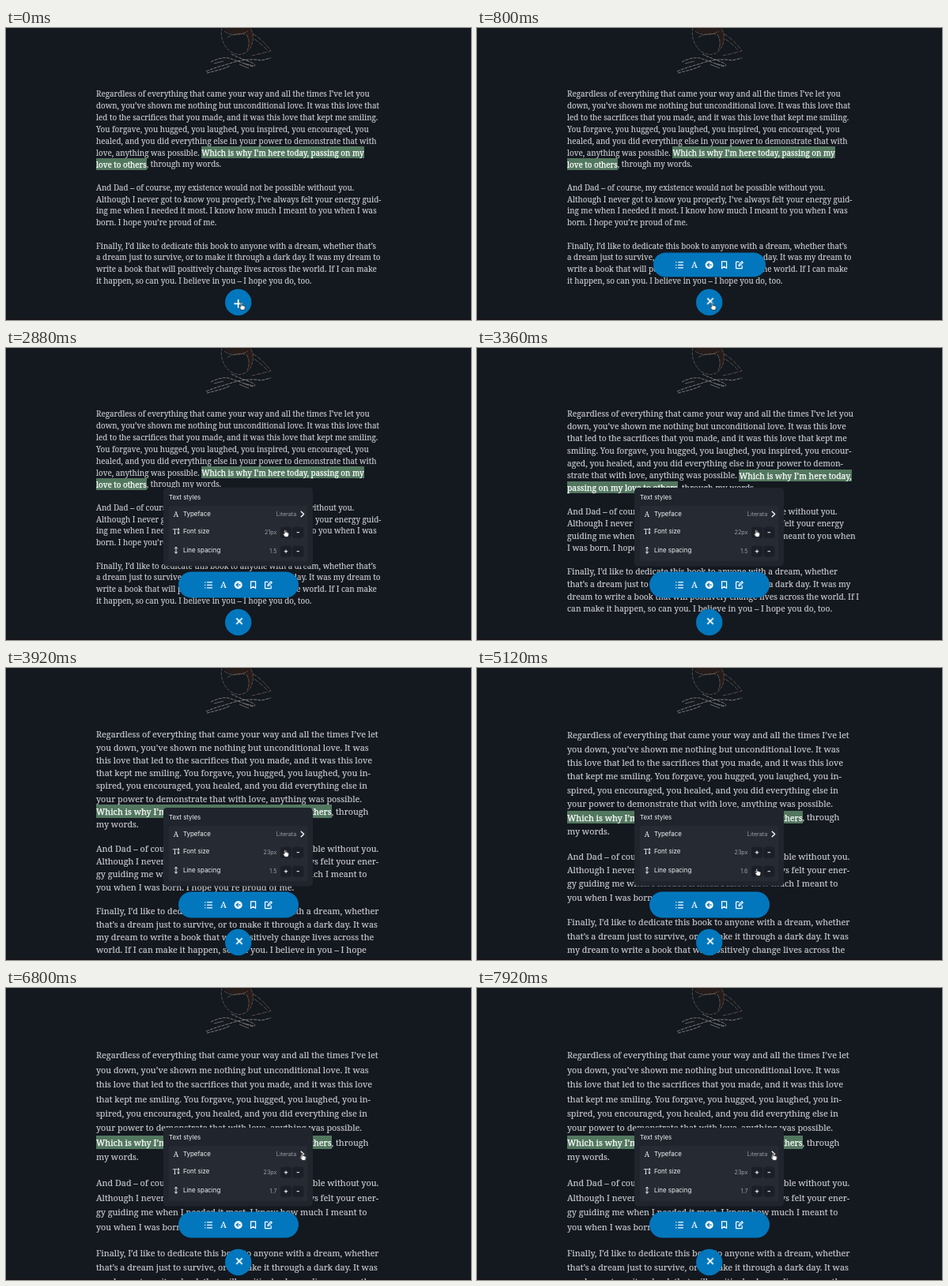
Write an HTML page that moves like this. It is 588x370 px and loops after 8 s.

```html
<!DOCTYPE html>
<html lang="en">
<head>
<meta charset="utf-8">
<title>Reader settings</title>
<style>
  html, body { margin: 0; width: 100%; height: 100%; overflow: hidden; background: #14181f; }
  #stage { position: relative; width: 588px; height: 370px; overflow: hidden; }
  .page { position: absolute; left: 114px; top: 76.3px; color: #c9cbce; white-space: nowrap;
    font-family: "Noto Serif", serif; -webkit-text-stroke: .15px; visibility: hidden; }
  .page p { margin: 0 0 14.5px; }
  mark { background: #52775f; color: #fff; padding: .06em 0; -webkit-text-stroke: .25px; }
  svg { position: absolute; inset: 0; }
  svg text { font-family: Inter, sans-serif; font-size: 7.9px; fill: #f1f2f4; }
  svg .serif { font-family: "Noto Serif", serif; text-anchor: middle; }
  svg .value { font-size: 7.2px; fill: #9a9da3; text-anchor: end; }
  .line { fill: none; stroke: #fff; stroke-width: 1.2; stroke-linecap: round; stroke-linejoin: round; }
  .sketch { fill: none; stroke: #75665b; stroke-width: .7; }
</style>
</head>
<body>
<div id="stage">
  <svg width="588" height="370" viewBox="0 0 588 370">
    <path d="M275 0C281 8 293 10 302 6C306 10 308 18 306 27C311 23 314 14 312 6L309 0Z" fill="#261c1a"/>
    <g class="sketch">
      <path d="M273 0C271 8 273 17 278 24C283 31 291 35 299 33C308 30 314 20 312 7L309 0" stroke-dasharray="4 1.5"/>
      <path d="M276 4C284 10 296 10 306 4M280 12C286 8 294 6 302 8M304 8C308 15 308 22 305 28" stroke-dasharray="5 1"/>
      <path d="M312 7C320 12 329 20 335 29C328 31 320 33 311 35M314 14C320 18 327 24 331 29" stroke-dasharray="6 1.5"/>
      <path d="M253 55C264 50 277 47 289 43C299 40 311 39 323 41L335 38M254 57C265 54 273 53 283 48" stroke="#aaa6a1" stroke-dasharray="4 1.2"/>
      <path d="M259 43C267 39 274 37 281 38C289 40 298 44 309 48C314 50 318 47 311 44C302 40 292 37 285 33" stroke="#a19a93" stroke-dasharray="4 1.2"/>
      <path d="M263 45L275 42M295 46L307 51M301 45L313 48" stroke="#8c857e"/>
    </g>
    <path d="M0 369.5H588" stroke="#1d1114"/>
  </svg>

  <div id="pages"></div>

  <svg width="588" height="370" viewBox="0 0 588 370">
    <g id="panel">
      <rect x="199" y="177" width="189" height="99.5" rx="4.5" fill="#20252d"/>
      <text x="206" y="192.3">Text styles</text>
      <rect x="206" y="200" width="175" height="70" rx="2" fill="#262b33"/>
      <text class="serif" x="215" y="214" style="font-size:9px">A</text>
      <text class="serif" x="213.6" y="235.6" style="font-size:9px">T</text>
      <path class="line" d="M218 229V235M216.9 230L218 228.8L219.1 230M216.9 234L218 235.2L219.1 234M215 252.5V260M213.4 254L215 252.2L216.6 254M213.4 258.5L215 260.3L216.6 258.5" style="stroke-width:.9"/>
      <text x="224" y="213.2">Typeface</text>
      <text x="224" y="234.7">Font size</text>
      <text x="224" y="259">Line spacing</text>
      <text class="value" x="367.3" y="213.2">Literata</text>
      <path class="line" d="M373.2 207.2L376.6 210.5L373.2 213.8" style="stroke-width:1.4"/>
      <g id="steppers"></g>
    </g>

    <g id="menu">
      <rect id="pill" x="218" y="283.5" width="152" height="33" rx="16.5" fill="#0277bd"/>
      <g id="icons">
        <path class="line" d="M254.5 296.8H260.5M254.5 300.3H260.5M254.5 303.8H260.5M251.6 296.8H252M251.6 300.3H252M251.6 303.8H252"/>
        <text class="serif" x="275" y="304.2" style="font-size:11.2px;font-weight:500;fill:#fff">A</text>
        <circle cx="293.7" cy="300.2" r="5" fill="#fff"/>
        <path class="line" d="M296.2 300.2H291.2M293.6 297.8L291.2 300.2L293.6 302.6" style="stroke:#0277bd"/>
        <path class="line" d="M309.6 295.8H315.6V304.6L312.6 302.2L309.6 304.6Z"/>
        <path class="line" d="M331 296.4H327.6V304.6H335.2V301.4M331 301.6L331.4 299.6L335 295.9L336.3 297.2L332.7 300.9Z"/>
      </g>
    </g>

    <g id="tip">
      <rect x="213" y="275.5" width="88" height="17.5" rx="2.5" fill="#fff"/>
      <text x="219" y="287.3" style="font-size:9.6px;fill:#111">Customize styles</text>
    </g>

    <circle cx="293.7" cy="347.5" r="16.7" fill="#0277bd"/>
    <path id="plus" class="line" d="M288.4 349.4H299M293.7 344.1V354.7" style="stroke-width:1.7;stroke-linecap:butt;transform-origin:293.7px 347.5px"/>

    <g id="cursor">
      <path d="M-1.9-3.8C-1.9-5-.3-5-.3-3.8V-1.3C.5-1.9 1.1-1.5 1.3-1.1C2-1.5 2.6-1.1 2.7-.6C3.4-.9 3.9-.3 3.9.3C3.9 2.2 3.2 2.8 3 4.4H-1.1C-1.6 3.2-3 2-3.5.8C-3.7.1-2.7-.3-1.9.8Z"
        fill="#fff" stroke="#111" stroke-width=".7" stroke-linejoin="round"/>
    </g>
  </svg>
</div>

<script>
const LOOP = 8000, SCALE = 9.86 / 21;
const $ = id => document.getElementById(id);

// A digit marks where that layout breaks the line; "~" before it adds a hyphen.
const paragraphs = [
  "Regardless of everything that came your way and all the times I’ve let 3you 12down, you’ve shown me nothing but unconditional love. It was 3this love 2that 1led to the sacrifices that you made, and it was this love 3that kept me 2smiling. 1You forgave, you hugged, you laughed, you in~3spired, you encour~2aged, you 1healed, and you did everything else in 3your power to demon~2strate that with 1love, anything was possible. 3<mark>Which is why I’m here today, 2passing on my 1love to others</mark>, through 3my words.",
  "And Dad – of course, my existence would not be possible without you. 123Although I never got to know you properly, I’ve always felt your ener~3gy 2guid~1ing me when I needed it most. I know how much I meant to 3you when 2I was 1born. I hope you’re proud of me.",
  "Finally, I’d like to dedicate this book to anyone with a dream, whether 23that’s 1a dream just to survive, or to make it through a dark day. It was 3my 2dream to 1write a book that will positively change lives across the 3world. If I 2can make 1it happen, so can you. I believe in you – I hope 3you do, too."
];

const setBreaks = (text, layout) => text.replace(/(~?)([123]+)/g, (_, hyphen, marks) =>
  marks.includes(layout) ? (hyphen && "-") + "<br>" : "");

const animate = (el, steps) => el.animate(
  steps.map(([time, frame, easing = "linear"]) => ({ offset: time / LOOP, easing, ...frame })),
  { duration: LOOP, iterations: Infinity });

function showBetween(el, from, to) {
  const on = { visibility: "visible" }, off = { visibility: "hidden" }, hold = "steps(1, end)";
  const steps = [[0, from ? off : on, hold]];
  if (from) steps.push([from, on, hold]);
  if (to < LOOP) steps.push([to, off, hold]);
  animate(el, [...steps, [LOOP, to < LOOP ? off : on]]);
}

// start, layout, font size, line spacing
const settings = [
  [0, "1", 21, 1.5], [3200, "2", 22, 1.5], [3760, "3", 23, 1.5],
  [5120, "3", 23, 1.6], [5760, "3", 23, 1.7]
];

settings.forEach(([start, layout, size, spacing], i) => {
  const end = i + 1 < settings.length ? settings[i + 1][0] : LOOP;
  const page = document.createElement("div");
  page.className = "page";
  page.style.fontSize = size * SCALE + "px";
  page.style.lineHeight = size * spacing * 9.9 / 21 + "px";
  page.innerHTML = paragraphs.map(p => `<p>${setBreaks(p, layout)}</p>`).join("");
  $("pages").append(page);
  showBetween(page, start, end);
});

const button = (x, y, sign) =>
  `<rect x="${x - 7}" y="${y - 7}" width="14" height="14" rx="3" fill="#1b1f27"/>
   <path class="line" style="stroke-width:1;stroke-linecap:butt" d="${sign}"
     transform="translate(${x} ${y})"/>`;
$("steppers").innerHTML = [233.7, 257.7].map(y =>
  button(354, y, "M-2.2 0H2.2M0-2.2V2.2") + button(369.3, y, "M-1.7 0H1.7")).join("");

function showValue(text, y, from, to) {
  const el = document.createElementNS("http://www.w3.org/2000/svg", "text");
  el.setAttribute("class", "value");
  el.setAttribute("x", 342.5);
  el.setAttribute("y", y);
  el.textContent = text;
  $("panel").append(el);
  showBetween(el, from, to);
}
showValue("21px", 236.2, 0, 3200);
showValue("22px", 236.2, 3200, 3760);
showValue("23px", 236.2, 3760, LOOP);
showValue("1.5", 260.2, 0, 5120);
showValue("1.6", 260.2, 5120, 5760);
showValue("1.7", 260.2, 5760, LOOP);

const fade = (el, ...steps) => animate(el, steps.map(([time, opacity]) => [time, { opacity }]));
fade($("panel"), [0, 0], [1440, 0], [1600, 1], [LOOP, 1]);
fade($("tip"), [0, 0], [1280, 0], [1360, 1], [2000, 1], [2160, 0], [LOOP, 0]);
fade($("icons"), [0, 0], [400, 0], [640, 1], [LOOP, 1]);
fade($("menu"), [0, 0], [240, 0], [480, 1], [LOOP, 1]);

$("pill").style.transformOrigin = "294px 300.2px";
const scale = s => ({ transform: `scale(${s})` });
animate($("pill"), [
  [0, scale(.3)], [240, scale(.3), "ease-out"], [800, scale(.934)], [960, scale(1)], [LOOP, scale(1)]
]);

const turn = deg => ({ transform: `rotate(${deg}deg)` });
animate($("plus"), [[0, turn(0)], [160, turn(0), "ease-out"], [560, turn(225)], [LOOP, turn(225)]]);

const at = (x, y) => ({ transform: `translate(${x}px, ${y}px)` });
animate($("cursor"), [
  [0, at(298.5, 353)], [960, at(298.5, 353), "ease-in-out"],
  [1360, at(275, 300.5)], [2000, at(275, 300.5), "ease-in-out"],
  [2800, at(353.7, 235)], [4080, at(353.7, 235), "ease-in-out"],
  [4800, at(355, 259)], [5680, at(355, 259)],
  [5840, at(361, 260.5), "ease-in-out"],
  [6640, at(375.5, 214)], [LOOP, at(375.5, 214)]
]);
</script>
</body>
</html>
```
